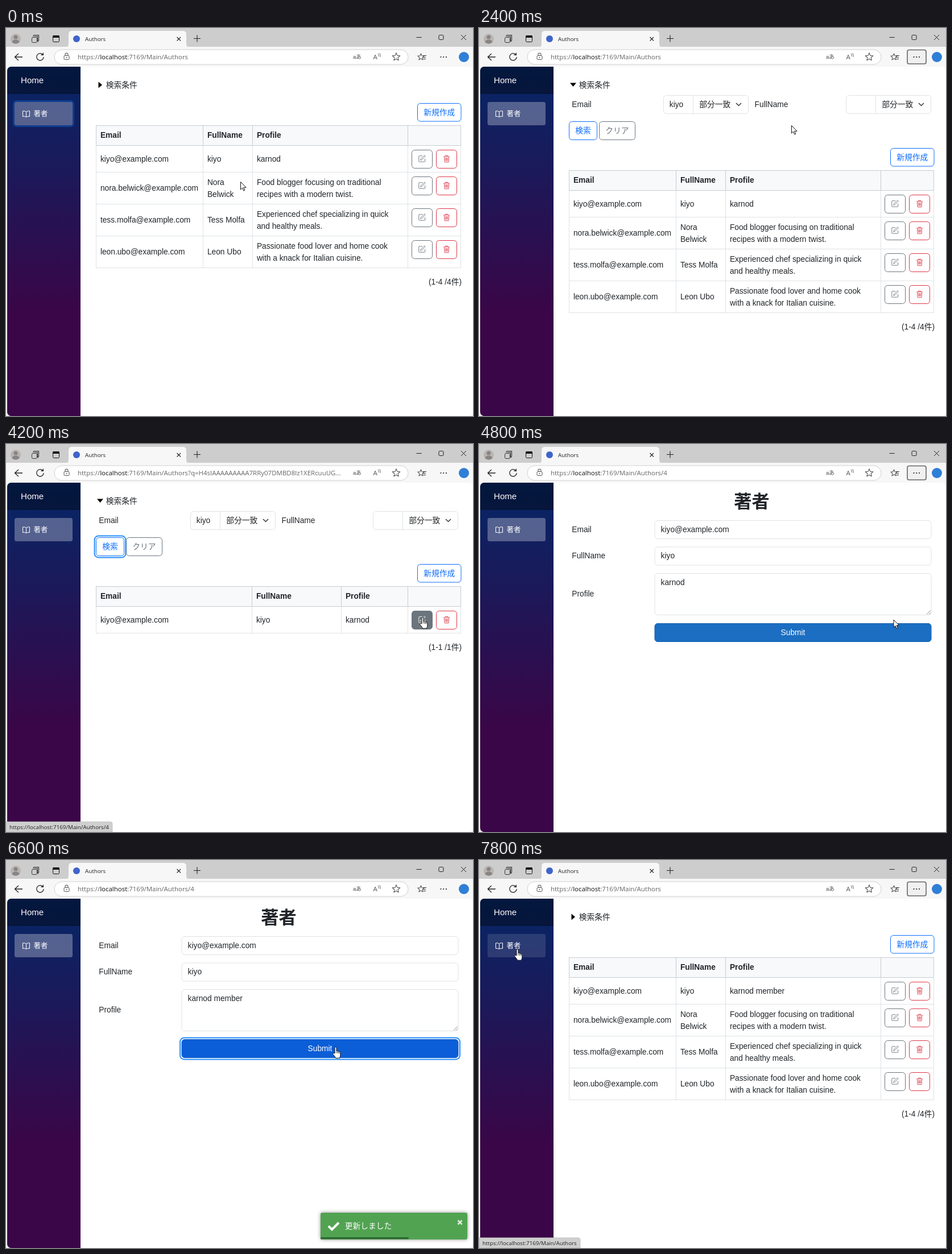
Recreate the animation shown at these times as an HTML page. Size 821 by 682 pixels, loop 8.4 s.

```html
<!DOCTYPE html>
<html lang="ja">
<head>
<meta charset="utf-8">
<title>Authors</title>
<style>
html, body { margin: 0; width: 100%; height: 100%; overflow: hidden; background: #f7f7f7; }
svg { display: block; width: 821px; height: 682px; }
text { font: 13.76px "Liberation Sans", "Noto Sans CJK JP", sans-serif; fill: #212529; white-space: pre; }
text.ui { font-family: "Open Sans", "Noto Sans CJK JP", sans-serif; }
.toast { filter: drop-shadow(0 0 3px rgba(0, 0, 0, .45)); }
</style>
</head>
<body>
<svg id="stage" viewBox="0 0 821 682">
  <defs>
    <linearGradient id="side" x1="0" y1="0" x2="0" y2="1">
      <stop offset="0" stop-color="#052767"/>
      <stop offset=".7" stop-color="#3a0647"/>
    </linearGradient>
    <clipPath id="page"><rect x="2" y="68" width="818.5" height="614" rx="7"/></clipPath>
  </defs>
  <g id="chrome"></g>
  <g id="scene"></g>
</svg>
<script>
const LOOP = 8400, STEP = 600;
const BLUE = '#0d6efd', GREY = '#6c757d', RED = '#dc3545', LINE = '#dee2e6', INK = '#333';
const BASE = 'https://localhost:7169/Main/Authors';
const QUERY = '?q=H4sIAAAAAAAAA7RRy07DMBD8lz1XERcuuUG...';

const attrs = o => Object.entries(o).map(([k, v]) => ` ${k}="${v}"`).join('');
const rect = (x, y, width, height, fill, more = {}) =>
  `<rect${attrs({ x, y, width, height, fill, ...more })}/>`;
// One-pixel border drawn inside the given bounds
const box = (x, y, w, h, stroke, fill = '#fff', rx = 5) =>
  rect(x + .5, y + .5, w - 1, h - 1, fill, { stroke, rx });
const path = (d, stroke = INK, more = {}) =>
  `<path${attrs({ d, stroke, fill: 'none', 'stroke-width': 1.1, ...more })}/>`;
const circle = (cx, cy, r, fill, more = {}) => `<circle${attrs({ cx, cy, r, fill, ...more })}/>`;
const text = (x, y, s, style = '', more = {}) => `<text${attrs({ x, y, style, ...more })}>${s}</text>`;
const mid = (x, y, s, fill) => text(x, y, s, `fill:${fill}`, { 'text-anchor': 'middle' });
const ui = (x, y, s, size, fill = '#222') => text(x, y, s, `font-size:${size}px;fill:${fill}`, { class: 'ui' });
const at = (x, y, k, s) => `<g transform="translate(${x} ${y}) scale(${k})">${s}</g>`;
const ring = (x, y, w, h) =>
  rect(x - 2.4, y - 2.4, w + 4.8, h + 4.8, 'none', { stroke: '#258cfb', 'stroke-width': 2, rx: 7 });

function button(x, y, w, h, label, color, solid) {
  return box(x, y, w, h, color, solid ? color : '#fff') +
    mid(x + w / 2, y + h / 2 + 4.5, label, solid ? '#fff' : color);
}

const star = (cx, cy, r) => {
  const pts = Array.from({ length: 10 }, (_, i) => {
    const a = i * Math.PI / 5 - Math.PI / 2, q = i % 2 ? r * .45 : r;
    return `${(cx + q * Math.cos(a)).toFixed(1)} ${(cy + q * Math.sin(a)).toFixed(1)}`;
  });
  return path(`M${pts.join('L')}Z`, '#555', { 'stroke-linejoin': 'round' });
};

function chrome() {
  return rect(0, 0, 821, 34, '#cdcdcd') + rect(0, 33, 821, 649, '#f7f7f7') +
    path('M104 34Q110 34 110 28V11Q110 5 116 5H311Q317 5 317 11V28Q317 34 323 34Z', 'none', { fill: '#f7f7f7' }) +
    circle(17, 19, 9, '#b9b5b3') + circle(17, 16, 3.6, '#8a8482') +
    path('M10.5 25Q11 20.5 17 20.5T23.5 25Q17 30 10.5 25Z', 'none', { fill: '#8a8482' }) +
    box(45, 16, 10, 10, INK, 'none', 2) + path('M47.500 15L49 12.500H57.500V22L55.500 24M49.500 14.500H55.500V23', INK) +
    box(82, 13, 12, 12, '#111', 'none', 2) + rect(82, 13, 12, 4, '#111', { rx: 1.5 }) +
    circle(124, 19, 6, '#3f63c8') + ui(139, 22.500, 'Authors', 9.8) +
    path('M300.500 16l6.500 6.500M307 16l-6.500 6.500M330 18.500h12M336 12.500v12', '#222') +
    path('M721.500 16.500h9M800 12l9 9M809 12l-9 9', '#222', { 'stroke-width': 1 }) +
    box(760.5, 12, 9, 9, '#222', 'none', 1.5) +
    path('M29 51H16M22 45l-6.500 6 6.500 6', '#222', { 'stroke-width': 1.3 }) +
    path('M64.500 46.500A6.200 6.200 0 1 0 66.200 51M65.300 43.500V47.300H61.500', '#222', { 'stroke-width': 1.3 }) +
    box(84.5, 37.5, 623, 27, '#d0d0d0', '#fff', 13) +
    box(101.5, 48, 10, 8, '#555', 'none', 1.5) + path('M104 48V46.500a2.500 2.500 0 0 1 5 0V48', '#555') +
    circle(106.5, 52, .9, '#555') +
    text(610, 54, 'aあ', 'font-size:9.500px;fill:#444') +
    ui(645.5, 55, 'A', 11.5, '#555') + path('M654 45q2 2 1 5M656.500 44q2.500 3 1.500 7', '#555', { 'stroke-width': .9 }) +
    star(686, 51, 7.2) + star(729.5, 51, 6) +
    path('M733 48.500h6M733 51.500h5M734 54.500h4', INK) +
    circle(805, 51, 9, '#2f7fd6');
}

function sidebar({ nav }) {
  const item = nav === 'hover' ? .12 : .29;
  return `<g clip-path="url(#page)">` + rect(2, 68, 819, 614, '#fff') +
    rect(2, 68, 129, 614, 'url(#side)') + rect(2, 68, 129, 48, '#000', { opacity: .4 }) + '</g>' +
    (nav === 'ring' ? rect(13.5, 128.5, 105, 44, 'none', { stroke: '#0f3d90', 'stroke-width': 3, rx: 5 }) : '') +
    rect(15, 130, 102, 41, '#fff', { opacity: item, rx: 3.5 }) +
    text(26, 97, 'Home', 'font-size:15.100px;fill:#fff') +
    path('M35.500 147.200Q32 145 29.500 146V155.500Q32 154.500 35.500 156.500Q39 154.500 41.500 155.500V146Q39 145 35.500 147.200V156', '#fff', { 'stroke-width': 1 }) +
    text(48.5, 154.7, '著者', 'font-size:12.400px;fill:#fff');
}

function toolbar({ more, url }) {
  const [, tail] = BASE.split('localhost');
  return (more ? rect(753, 38.5, 33, 24.5, '#f0f0f0', { stroke: '#666', 'stroke-width': 1.6, rx: 3 }) : '') +
    [764.5, 769.2, 774].map(x => circle(x, 51, 1.1, '#222')).join('') +
    ui(126, 55, `https://<tspan fill="#111" style="fill:#111">localhost</tspan>${tail}${url || ''}`, 11.47, '#666');
}

const people = [
  ['kiyo', 'kiyo', ''],
  ['nora.belwick', 'Nora|Belwick', 'Food blogger focusing on traditional|recipes with a modern twist.'],
  ['tess.molfa', 'Tess Molfa', 'Experienced chef specializing in quick|and healthy meals.'],
  ['leon.ubo', 'Leon Ubo', 'Passionate food lover and home cook|with a knack for Italian cuisine.']
];
const mail = id => `${id}@example.com`;

function cell(x, cy, s) {
  const lines = s.split('|');
  const y = cy + 4.7 - (lines.length - 1) * 10.3;
  return lines.map((l, i) => text(x, y + i * 20.6, l)).join('');
}

function rowButtons(y, hot) {
  const pen = hot ? '#fff' : GREY;
  return box(713, y, 37, 33, GREY, hot ? GREY : '#fff') + box(756, y, 37, 33, RED) +
    at(724.5, y + 9, .84,
      path('M9 2H2.500a1 1 0 0 0-1 1v10.500a1 1 0 0 0 1 1h11a1 1 0 0 0 1-1V8', pen) +
      path('M5 11l.8-2.600 7.600-7.600 1.800 1.800-7.600 7.600z', pen)) +
    at(768, y + 9, .82,
      path('M1.500 3.500h13M5.500 3V1.500h5V3M3 4l.8 11.500h8.400L13 4M5.700 6l.3 7M8 6v7M10.300 6 10 13', RED));
}

function table(top, s) {
  const one = s.rows === 1;
  const cols = one ? [158.5, 432.5, 589.5, 706.5, 799.5] : [158.5, 346.5, 433.5, 706.5, 799.5];
  const tx = cols.map(x => x + 7.4), body = top + 36;
  const edge = '#c6ccd2';
  let out = rect(158.5, top + .5, 641, 35, '#f8f9fa');
  out += ['Email', 'FullName', 'Profile'].map((h, i) => text(tx[i], top + 22.3, h, 'font-weight:700')).join('');
  let y = body;
  people.slice(0, s.rows).forEach(([id, name, about], i) => {
    const h = i ? 56 : 47, cy = y + h / 2 - .3;
    out += cell(tx[0], cy, mail(id)) + cell(tx[1], cy, name) + cell(tx[2], cy, about || s.profile) +
      rowButtons(y + 7, s.editHot);
    y += h;
    out += path(`M158 ${y - .5}H800`, LINE, { 'stroke-width': 1 });
  });
  out += cols.map(x => path(`M${x} ${body}V${y}`, LINE, { 'stroke-width': 1 }) +
    path(`M${x} ${top}V${body}`, edge, { 'stroke-width': 1 })).join('');
  out += path(`M158 ${top + .5}H800M158 ${body - .5}H800`, edge, { 'stroke-width': 1 });
  return out + text(801, y + 29, `(1-${s.rows} /${s.rows}件)`, '', { 'text-anchor': 'end' });
}

function filter(x, label, labelX, value) {
  return text(labelX, 138.7, label) + box(x, 118, 150, 33, LINE) +
    path(`M${x + 52.5} 118V151`, LINE, { 'stroke-width': 1 }) +
    text(x + 10.8, 138.7, value) + text(x + 63.3, 138.7, '部分一致') +
    path(`M${x + 128} 132l4.500 4.500 4.500-4.500`, '#343a40', { 'stroke-width': 1.5 });
}

function list(s) {
  const shift = s.open ? 79 : 0;
  let out = path(s.open ? 'M160 96.500H171L165.500 103Z' : 'M162.500 94.500V105.500L169 100Z', 'none', { fill: '#000' }) +
    text(175.7, 104.7, '検索条件');
  if (s.open) {
    out += filter(324, 'Email', 163.3, s.query || '') + filter(645, 'FullName', 484.6, '') +
      button(158, 164, 50, 33, '検索', BLUE, s.searchHot) + button(211, 164, 64, 33, 'クリア', GREY);
  }
  if (s.focus === 'summary') out += rect(158, 90, 73, 21, 'none', { stroke: '#101010', 'stroke-width': 2, rx: 2 });
  if (s.focus === 'query') out += ring(324, 118, 53, 33) + path('M335.500 127V142', '#000', { 'stroke-width': 1 });
  if (s.focus === 'search') out += ring(158, 164, 50, 33);
  return out + button(723, 132 + shift, 77.5, 32.5, '新規作成', BLUE) + table(171 + shift, s);
}

function form(s) {
  const hot = s.submitHot;
  const field = (y, h, label, ly, value) =>
    text(163.3, ly, label) + box(308.5, y, 487, h, LINE) + text(319.6, y + 20.8, value);
  let out = text(479.5, 112, '著者', 'font-size:31.200px;font-weight:700', { 'text-anchor': 'middle' }) +
    field(134, 33, 'Email', 154.8, mail('kiyo')) +
    field(180.5, 33, 'FullName', 201.3, 'kiyo') +
    field(227, 74, 'Profile', 268.3, s.profile) +
    path('M787 299.500l7-7M791 299.500l3-3', '#777', { 'stroke-width': .9 }) +
    box(308.5, 315, 487, 33, hot ? '#0a58ca' : '#1861ac', hot ? '#0b5ed7' : '#1b6ec2') +
    mid(552, 335.7, 'Submit', '#fff');
  if (s.focus === 'profile') {
    const caret = s.profile === PLAIN ? 362.5 : 416.5;
    out += ring(308.5, 227, 487, 74) + path(`M${caret} 236V250`, '#000', { 'stroke-width': 1 });
  }
  if (s.focus === 'submit') out += ring(308.5, 315, 487, 33);
  return out;
}

const toast = left => '<g class="toast">' + rect(553, 620, 258, 47, '#51a351', { rx: 3 }) + '</g>' +
  path('M567 643.500l6 6 12-12', '#fff', { 'stroke-width': 4 }) +
  text(595.7, 647.5, '更新しました', 'fill:#fff;font-weight:500') +
  path('M794.500 633.500l7 7M801.500 633.500l-7 7', '#dcecdc', { 'stroke-width': 2.6 }) +
  rect(553, 663, 258 * left, 3.5, '#2f6a30');

const status = link => path(`M0 682V664H${link ? 183 : 174}q4 0 4 4V682Z`, '#bdbdbd', { fill: '#cfcfcf', 'stroke-width': .8 }) +
  ui(6, 677, BASE + link, 9.8);

const tip = () => rect(725.5, 64.5, 89, 20, '#fff', { stroke: '#444' }) + ui(732, 78.3, '設定など (Alt + F)', 10);

const cursors = {
  arrow: path('M.500 .500V14L3.600 11 5.700 16 7.800 15.100 5.700 10.300H10Z', '#111', { fill: '#fff', 'stroke-width': 1 }),
  hand: path('M4 12V2.200a1.500 1.500 0 0 1 3 0V8.200a1.400 1.400 0 0 1 2.600 .4 1.400 1.400 0 0 1 2.200 .8 1.200 1.200 0 0 1 2 1V15.500c0 2-1 2.500-1.300 4.700H5.600C5 17.800 2.500 16 1 13.400 0 11.800 1.800 10.800 2.800 11.600Z',
    '#111', { fill: '#fff', 'stroke-width': 1 }) + path('M7 8.500V11.500M9.500 9V12M11.800 9.700V12', '#111', { 'stroke-width': .9 })
};

const PLAIN = 'karnod', EDITED = 'karnod member';
const hand = (x, y) => ['hand', x, y], arrow = (x, y) => ['arrow', x, y];
const idle = { view: list, rows: 4, profile: PLAIN };
const opened = { ...idle, open: true, more: true };
const found = { ...opened, rows: 1, query: 'kiyo', more: false, url: QUERY };
const edit = { view: form, profile: PLAIN, url: '/4' };
const saved = { ...edit, profile: EDITED };
const back = { nav: 'hover', status: '', more: true, cursor: hand(62, 156) };

const steps = [
  { ...idle, nav: 'ring', cursor: arrow(412, 270) },
  { ...idle, more: true, cursor: hand(162, 105) },
  { ...opened, focus: 'summary', cursor: hand(162, 105) },
  { ...opened, focus: 'query' },
  { ...opened, query: 'kiyo', cursor: arrow(549, 171) },
  { ...opened, query: 'kiyo', searchHot: true, cursor: hand(187, 179) },
  { ...found, searchHot: true, cursor: hand(187, 179) },
  { ...found, focus: 'search', editHot: true, status: '/4', cursor: hand(727, 304) },
  { ...edit, more: true, cursor: arrow(728.5, 308.5) },
  { ...edit, focus: 'profile' },
  { ...saved, focus: 'profile', more: true, submitHot: true, cursor: hand(574, 328) },
  { ...saved, focus: 'submit', submitHot: true, toast: .6, cursor: hand(574, 328) },
  { ...saved, ...back, toast: .085, tip: true },
  { ...idle, ...back, profile: EDITED }
];

const scene = document.getElementById('scene');
document.getElementById('chrome').innerHTML = chrome();

function draw(s) {
  let out = sidebar(s) + toolbar(s) + s.view(s);
  if (s.toast) out += toast(s.toast);
  if (s.status !== undefined) out += status(s.status);
  if (s.tip) out += tip();
  if (s.cursor) {
    const [kind, x, y] = s.cursor;
    out += at(x, y, 1, cursors[kind]);
  }
  scene.innerHTML = out;
}

const start = performance.now();
let shown = -1;
function tick() {
  const i = Math.floor((performance.now() - start) % LOOP / STEP);
  if (i !== shown) draw(steps[shown = i]);
  requestAnimationFrame(tick);
}
tick();
</script>
</body>
</html>
```
